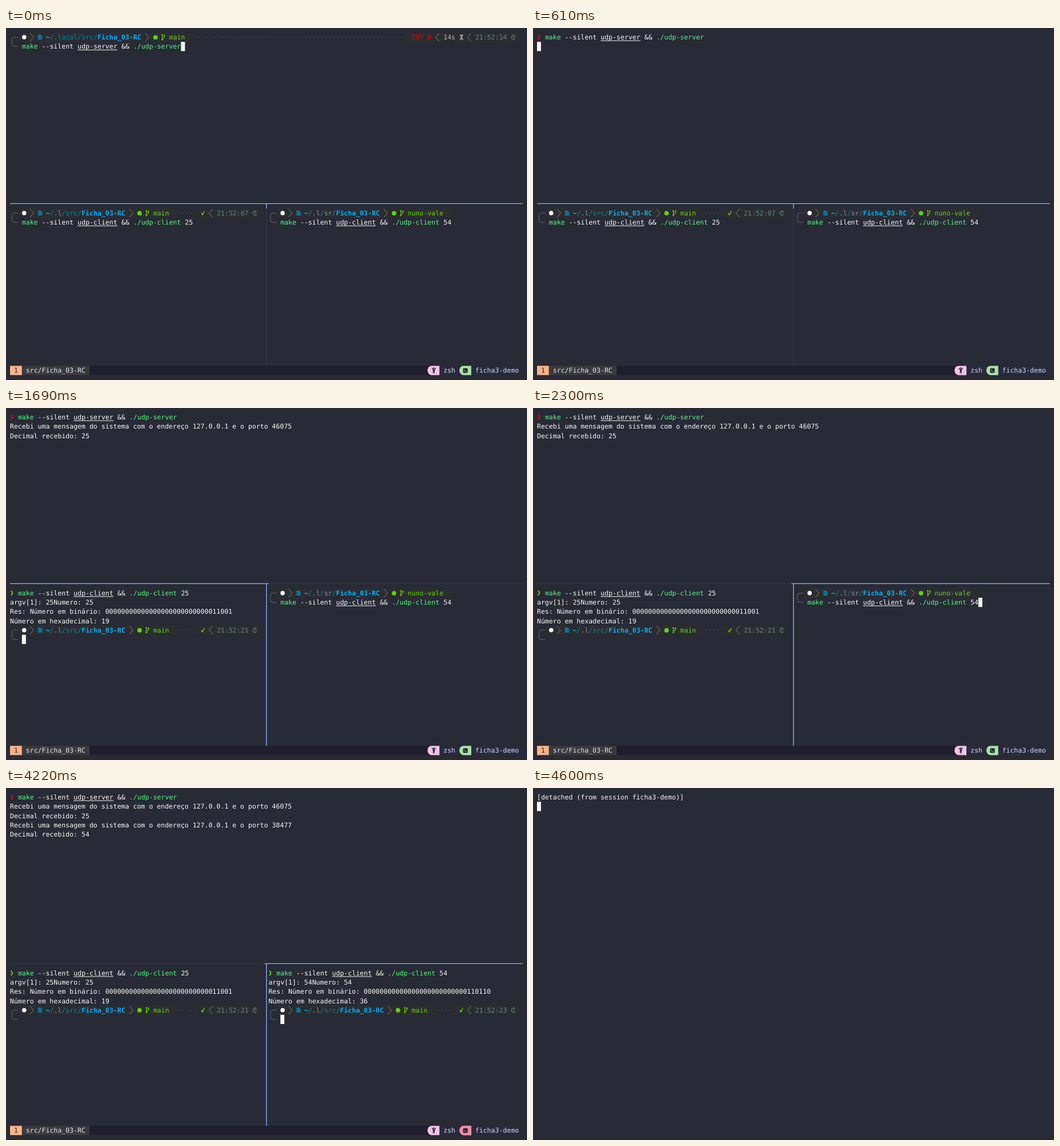
These frames come from a looping animation (910x616 px, 9.6 s). An HTML page:

```html
<!DOCTYPE html>
<html lang="pt">
<head>
<meta charset="utf-8">
<title>UDP demo</title>
<style>
  html, body { margin: 0; width: 100%; height: 100%; overflow: hidden; background: #282a36; }
  svg { display: block; }
  text {
    font: 11.536px "DejaVu Sans Mono", "Noto Sans Mono", monospace;
    white-space: pre;
    text-rendering: geometricPrecision;
  }
  .b { font-weight: bold; }
  .line { fill: none; stroke-linecap: round; stroke-linejoin: round; }
  .scene { animation: 9600ms step-end infinite; }
</style>
</head>
<body>
<svg id="stage" width="910" height="616"></svg>
<script>
const LOOP = 9600, END = 4600;
const W = 6.945, H = 16.2;
const FG = '#f8f8f2', GREEN = '#50fa7b', LIME = '#5fd700', RED = '#d70000';
const BLUE = '#00afff', TEAL = '#0087af', MAUVE = '#8787af', TIME = '#5f8787';
const GREY = '#7a7a7a', SEGMENT = '#2c2d31';
const BAR = '#1e1e2e', MODULE = '#2a2a3c', LABEL = '#cdd6f4';
const ACTIVE = '#89b4fa', IDLE = '#34364a';

const X = col => 7 + col * W;
const Y = row => 8 + row * H;

const text = (col, row, s, fill = FG, cls = '') =>
  `<text class="${cls}" x="${X(col)}" y="${Y(row) + 12.1}" fill="${fill}">${s.replace(/&/g, '&amp;')}</text>`;
const rect = (col, row, cols, fill, extra = '') =>
  `<rect x="${X(col)}" y="${Y(row)}" width="${cols * W}" height="${H}" fill="${fill}" ${extra}/>`;
const at = (col, row, body) => `<g transform="translate(${X(col)} ${Y(row)})">${body}</g>`;
const line = (d, color, width = 1, extra = '') =>
  `<path class="line" d="${d}" stroke="${color}" stroke-width="${width}" ${extra}/>`;
const shape = (d, fill) => `<path d="${d}" fill="${fill}"/>`;
const dot = (x, y, r, fill) => `<circle cx="${x}" cy="${y}" r="${r}" fill="${fill}"/>`;
const cursor = (col, row) => rect(col, row, 1, FG);
const segment = (from, to) => rect(from, 0, to - from, SEGMENT, 'rx="7" ry="8.1"');

const icon = {
  next: line('M.5 1L6.4 8.1L.5 15.2', GREY),
  prev: line('M6.4 1L.5 8.1L6.4 15.2', GREY),
  folder: shape('M.4 4h4.4l2.8 2.6v5.6H.4z', TEAL) + line('M2 6.8H5.4M1.6 9.6H7.4', SEGMENT, .7),
  branch: line('M2 4.4V12M2 10Q5.8 9.4 5.8 6', LIME, 1.2) +
    dot(2, 4.2, 1.3, LIME) + dot(5.8, 5, 1.3, LIME) + dot(2, 12.2, 1.3, LIME),
  ok: line('M1.2 8.8L2.8 11.4L5.8 5.2', LIME, 1.5),
  fail: line('M1.3 5.2L5.6 11.2M5.6 5.2L1.3 11.2', RED, 1.6),
  glass: shape('M.8 3.8H6.8V5.2L4.6 8.2L6.8 11.2V12.6H.8V11.2L3 8.2L.8 5.2z', '#a8a8a8') +
    line('M2.2 5.8H5.4M2.4 11H5.2', SEGMENT, .6),
  clock: line('M6.6 5.2A3.7 3.7 0 1 0 6.6 11.2M4.3 6.2V8.4H6.6', TIME, 1.1),
  person: dot(11, 4, 1.2, BAR) + line('M8 4.4L10.2 6.8H11.8L14 4.4', BAR, 1.4) +
    shape('M9.5 6.2H12.5V13.4H11.4V10.4H10.6V13.4H9.5z', BAR)
};
const shell = color =>
  `<rect x="6.6" y="4.2" width="8" height="8" rx="1" fill="${BAR}"/>` +
  line('M8.4 6.4L10 8L8.4 9.6M10.8 10H12.6', color, 1);

// path is a list of [text, colour] parts
function prompt(col, row, path, branch, right = '') {
  let c = 9, out = '';
  for (const [s, color] of path) {
    out += text(c, 0, s, color);
    c += s.length;
  }
  const end = c + 18 + branch.length + 2;
  const body = line('M13.6 8.1H7.5Q3.5 8.1 3.5 12.1V20.3Q3.5 24.3 7.5 24.3H13.6', '#62646c')
    .replace('<path', `<path transform="translate(${X(0)} ${Y(0)})"`) +
    segment(2, end) + dot(X(3) + 3.9, Y(0) + 8.1, 3.8, FG) +
    at(5, 0, icon.next) + at(7, 0, icon.folder) + out +
    text(9, 0, '~', BLUE, 'b') + text(c, 0, 'Ficha_03-RC', BLUE, 'b') +
    at(c + 12, 0, icon.next) + dot(X(c + 14) + 4, Y(0) + 8.3, 3.9, LIME) +
    at(c + 16, 0, icon.branch) + text(c + 18, 0, branch, LIME);
  return `<g transform="translate(${col * W} ${row * H})">${body}${right}</g>`;
}
const dots = (from, to) =>
  line(`M${X(from + .5)} ${Y(.5)}H${X(to)}`, '#5c5e68', 1.5, `stroke-dasharray="0 ${W}"`);
const clock = (col, time) =>
  at(col, 0, icon.prev) + text(col + 2, 0, time, TIME) + at(col + 11, 0, icon.clock);
const okSide = time => dots(42, 46) + segment(46, 63) + at(48, 0, icon.ok) + clock(50, time);
const failSide = dots(46, 99) + segment(99, 128) + text(101, 0, 'INT', RED) +
  at(105, 0, icon.fail) + at(107, 0, icon.prev) + text(109, 0, '14s', '#b4b4b4') +
  at(113, 0, icon.glass) + clock(115, '21:52:14');

const shortPath = [['~', BLUE], ['/', TEAL], ['.l', MAUVE], ['/src/', TEAL]];
const shorterPath = [['~', BLUE], ['/', TEAL], ['.l', MAUVE], ['/', TEAL], ['sr', MAUVE], ['/', TEAL]];

const command = (col, row, name, arg = '') =>
  text(col, row, 'make', GREEN) + text(col + 5, row, '--silent') + text(col + 14, row, name) +
  `<rect x="${X(col + 14)}" y="${Y(row) + 13.7}" width="${10 * W}" height="1" fill="${FG}"/>` +
  text(col + 25, row, '&&') + text(col + 28, row, './' + name, GREEN) + text(col + 41, row, arg);
const ran = (col, row, color, name, arg) =>
  at(col, row, line('M2.2 4.4Q5.8 8.1 2.2 11.8', color, 1.9)) + command(col + 2, row, name, arg);

const clientRun = (col, n, time) =>
  ran(col, 19, LIME, 'udp-client', '' + n) +
  text(col, 20, `argv[1]: ${n}Numero: ${n}`) +
  text(col, 21, 'Res: Número em binário: ' + n.toString(2).padStart(32, '0')) +
  text(col, 22, 'Número em hexadecimal: ' + n.toString(16)) +
  prompt(col, 23, shortPath, 'main', okSide(time));
const serverLog = (row, port, n) =>
  text(0, row, `Recebi uma mensagem do sistema com o endereço 127.0.0.1 e o porto ${port}`) +
  text(0, row + 1, `Decimal recebido: ${n}`);

function status(col, color, glyph, label) {
  const pill = `M${3 * W} 0H${W}a${W} ${H / 2} 0 0 0 0 ${H}H${3 * W}z`;
  return rect(col, 36, 1, BAR) + rect(col + 3, 36, label.length + 2, MODULE) +
    at(col, 36, shape(pill, color) + glyph) + text(col + 4, 36, label, LABEL);
}
const session = color => status(113, color, shell(color), 'ficha3-demo');
const program = (col, name) => status(col, '#f5c2e7', icon.person, name);

const MX = X(64.5), MY = Y(18.5) - .4, BOTTOM = Y(36);
const border = (d, color) => `<path d="${d}" fill="none" stroke="${color}" stroke-width="1.3"/>`;
const across = (from, to) => `M${X(from)} ${MY}H${X(to)}`;
const down = `M${MX} ${MY}V${BOTTOM}`;

const stage = document.getElementById('stage');
const sheet = document.querySelector('style').sheet;
let count = 0;

// Shows its parts between two times of the loop
function scene(from, to, ...parts) {
  const name = 'scene' + count++;
  const pct = ms => (ms / LOOP * 100).toFixed(4) + '%';
  const start = from ? '0% { visibility: hidden }' : '';
  sheet.insertRule(`@keyframes ${name} { ${start} ${pct(from)} { visibility: visible }
    ${pct(to)} { visibility: ${to < LOOP ? 'hidden' : 'visible'} } }`, sheet.cssRules.length);
  stage.insertAdjacentHTML('beforeend',
    `<g class="scene" style="animation-name:${name}">${parts.join('')}</g>`);
}

// Status bar
scene(0, END,
  rect(0, 36, 129, BAR), rect(0, 36, 3, '#fab387'), text(1, 36, '1', BAR),
  rect(3, 36, 17, '#3a3a3e'), text(4, 36, 'src/Ficha_03-RC', '#e2e4ea'),
  program(105, 'zsh'), session('#a6e3a1'));
scene(1040, 1370, program(96, './udp-server'));
scene(4220, END, session('#f38ba8'));

// Pane borders
scene(0, END, border(across(0, 129) + down, IDLE));
scene(0, 1370, border(across(0, 129) + `M${MX} ${MY}V${Y(19)}`, ACTIVE));
scene(1370, 2300, border(across(0, 65) + down, ACTIVE));
scene(2300, END, border(across(64, 129) + down, ACTIVE));

// Server pane
scene(0, 610,
  prompt(0, 0, [['~', BLUE], ['/.local/src/', TEAL]], 'main', failSide),
  command(3, 1, 'udp-server'), cursor(43, 1));
scene(610, END, ran(0, 0, '#ff0000', 'udp-server'));
scene(610, 1370, cursor(0, 1));
scene(1690, END, serverLog(1, 46075, 25));
scene(2860, END, serverLog(3, 38477, 54));

// Left client pane
scene(0, 1690,
  prompt(0, 19, shortPath, 'main', okSide('21:52:07')), command(3, 20, 'udp-client', '25'));
scene(1370, 1690, cursor(46, 20));
scene(1690, END, clientRun(0, 25, '21:52:21'));
scene(1690, 2300, cursor(3, 24));

// Right client pane
scene(0, 2860,
  prompt(65, 19, shorterPath, 'nuno-vale'), command(68, 20, 'udp-client', '54'));
scene(2300, 2860, cursor(111, 20));
scene(2860, END, clientRun(65, 54, '21:52:23'), cursor(68, 24));

// Detached terminal
scene(END, LOOP, text(0, 0, '[detached (from session ficha3-demo)]'), cursor(0, 1));
</script>
</body>
</html>
```
